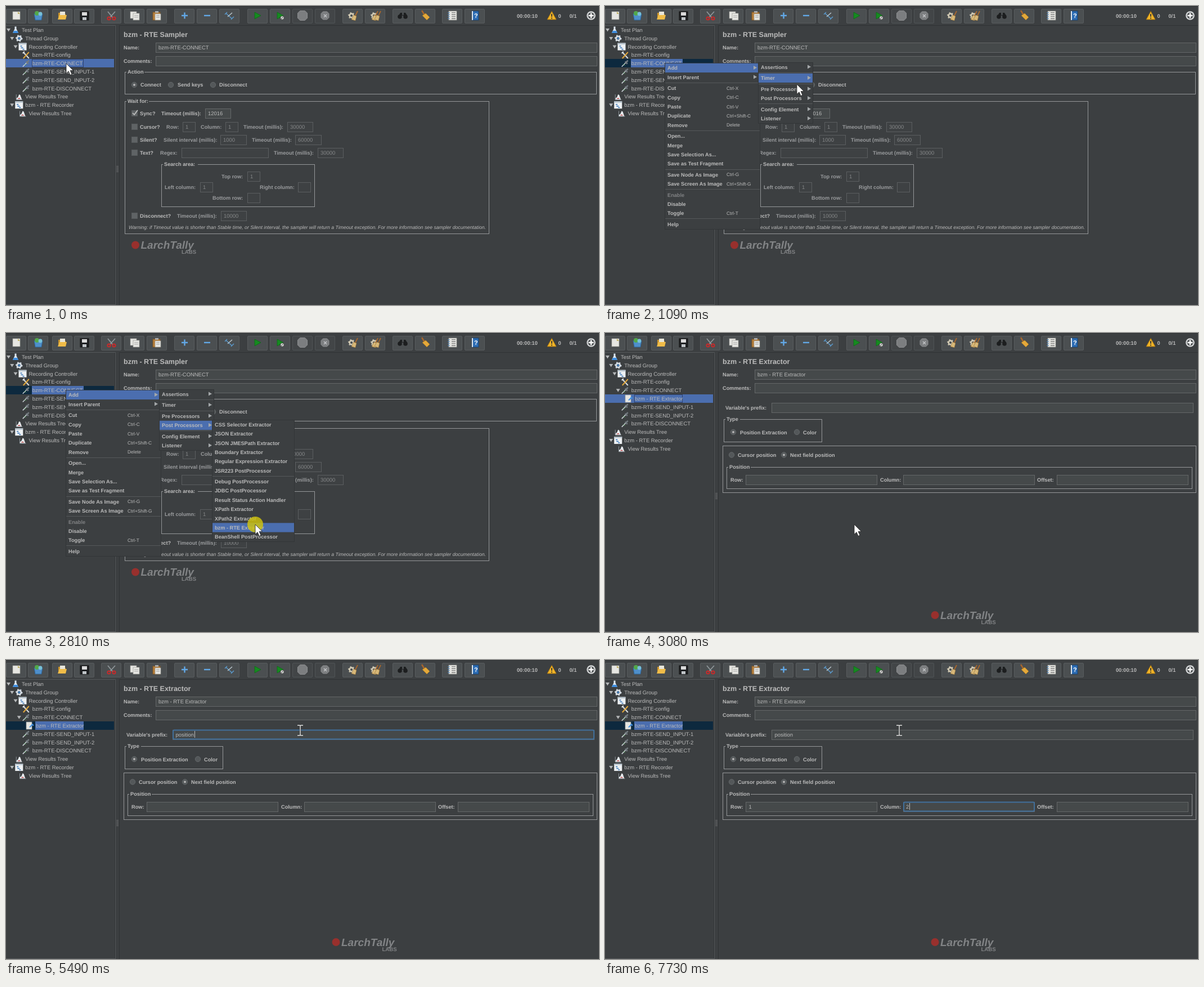
These frames come from a looping animation (1054x531 px, 8 s). An HTML page:

```html
<!DOCTYPE html>
<html lang="en">
<head>
<meta charset="utf-8">
<title>RTE Extractor</title>
<style>
  html, body { margin: 0; width: 100%; height: 100%; overflow: hidden; background: #3c3f41; }
  svg { display: block; width: 1054px; height: 531px; }
  text { font-family: "Liberation Sans", Arial, sans-serif; text-rendering: geometricPrecision; white-space: pre; }
</style>
</head>
<body>
<svg id="stage" viewBox="0 0 1054 531" xmlns="http://www.w3.org/2000/svg"></svg>
<script>
const BG = '#3c3f41', FG = '#bbbbbb', DIM = '#9a9c9e', OFF = '#868889', BLUE = '#4b6eaf', NAVY = '#0d293e', RING = '#41709c';
const LOOP = 8000;

// ---- drawing helpers, all return markup
const rect = (x, y, w, h, fill = 'none', stroke = 'none', extra = '') =>
  `<rect x="${x}" y="${y}" width="${w}" height="${h}" fill="${fill}" stroke="${stroke}" ${extra}/>`;
const box = (x, y, w, h, fill, stroke, extra) => rect(x + .5, y + .5, w - 1, h - 1, fill, stroke, extra);
const path = (d, fill = 'none', stroke = 'none', w = 1) =>
  `<path d="${d}" fill="${fill}" stroke="${stroke}" stroke-width="${w}"/>`;
const dot = (x, y, r, fill, stroke = 'none', w = 1) =>
  `<circle cx="${x}" cy="${y}" r="${r}" fill="${fill}" stroke="${stroke}" stroke-width="${w}"/>`;
const text = (x, cy, str, size = 9.45, fill = FG, extra = '') =>
  `<text x="${x}" y="${(cy + size * .36).toFixed(2)}" font-size="${size}" fill="${fill}" ${extra}>${str}</text>`;
const bold = (x, cy, str, fill = FG, size = 9.2) => text(x, cy, str, size, fill, 'font-weight="700"');
const group = (id, body) => `<g id="${id}">${body}</g>`;
const at = (x, y, body) => `<g transform="translate(${x} ${y})">${body}</g>`;

const field = (x, cy, w, str = '', off = false) =>
  box(x, Math.round(cy - 9), w, 18, off ? '#3e4143' : '#45494a', off ? '#5b5e60' : '#646768') +
  text(x + 5, cy, str, 9.45, off ? OFF : FG);
const frame = (x, y, w, h, title = '', gap = 0) =>
  box(x, y, w, h, 'none', '#959799') +
  (title && rect(x + 3, y - 3, gap, 8, BG) + bold(x + 5, y, title));
const radio = (x, y, on) => dot(x, y, 4.7, '#54585a', '#64686a') + (on ? dot(x, y, 2, '#b4b4b4') : '');
const check = (x, y, on) => box(x - 5, y - 5, 11, 11, '#5f6365', '#575b5d') +
  (on ? path(`M${x - 3} ${y}l3 3 6-8`, 'none', '#c4c4c4', 1.6) : '');
const logo = (x, y) => dot(x + 10, y, 7, '#98302d') +
  text(x + 19.5, y, 'LarchTally', 19, '#828486', 'font-weight="700" font-style="italic"') +
  bold(x + 92, y + 12.5, 'LABS', '#828486', 9.6);

// ---- toolbar
const page = (x, y, w, h) => rect(x, y, w, h, '#e6e6e2', '#9a9a96', 'stroke-width=".7"');
const gear = (r, fill) => dot(0, 0, r, 'none', fill, r * .75) +
  `<circle r="${r * 1.45}" fill="none" stroke="${fill}" stroke-width="2" stroke-dasharray="2 ${(r * .9).toFixed(2)}"/>`;
const octagon = s => path(`M${-s / 2} ${-s}H${s / 2}L${s} ${-s / 2}V${s / 2}L${s / 2} ${s}H${-s / 2}L${-s} ${s / 2}V${-s / 2}Z`, '#7c7e80', '#8c8e90');
const broom = (x, y) => path(`M${x + 5} ${y - 9}l-4 8`, 'none', '#a8662c', 1.8) +
  path(`M${x - 2} ${y - 2}l5 2-2 8-7-2z`, '#d8b878', '#8f6c34', .6);
const play = path('M-5-6L6 0-5 6Z', '#168a20', '#0c6a16', .8);
const gears = at(-2, 0, gear(3.4, '#d2cab4'));

const tools = [
  [18, page(-6, -7, 13, 14) + path('M3-7l4 4h-4z', '#c0b060')],
  [57, path('M-7-3H8L6 8H-5Z', '#4e8fca', '#2f6394') + dot(-2, -4, 4, '#52a84a') + dot(4, -3, 3.4, '#78c0d8')],
  [100, path('M-7 7V-5h5l2 2h6V7Z', '#c8922a') + rect(-4, -7, 9, 8, '#e8e6da') + path('M-8 7l3-8H8L6 7Z', '#f0bc48')],
  [139, rect(-7, -7, 15, 15, '#202224', '#111') + rect(-4, -6, 9, 6, '#dadada') + rect(-3, 3, 7, 5, '#bfc4c8')],
  [187, path('M-6-7L3 4M7-7L-3 4', 'none', '#8f969a', 1.8) + dot(-4, 5, 2.6, 'none', '#c82a2a', 2) + dot(5, 5, 2.6, 'none', '#c82a2a', 2)],
  [228, page(-7, -7, 11, 12) + page(-2, -4, 11, 12) + path('M0 0h7M0 3h7', 'none', '#999', .8)],
  [268, rect(-7, -6, 13, 14, '#b8803c', '#7c5524') + rect(-3, -8, 6, 3, '#aaa') + page(-3, -3, 10, 11) + path('M-1 0h6M-1 3h6', 'none', '#888', .8)],
  [317, path('M-5 0H6M.5-5.500V5.500', 'none', '#62a8e6', 2.4)],
  [357, path('M-5 0H6', 'none', '#62a8e6', 2.4)],
  [397, path('M-8-2l4-4M-6-4L4 5M3 7l5-5', 'none', '#5a97c8', 1.6) + path('M-3 2L5-5', 'none', '#bcc8ce', 1.4)],
  [447, play],
  [487, play + dot(4, 4, 3.2, '#d8d8d8', '#333', .7) + path('M2.500 5.500l3-3', 'none', '#333')],
  [527, octagon(8.5), 1],
  [567, octagon(7) + path('M-2-2L3 3M3-2L-2 3', 'none', '#c4c6c8', 1.4), 1],
  [616, gears + broom(4, 1)],
  [656, gears + broom(0, 1) + broom(5, 1)],
  [705, dot(-5, 2, 3.8, '#1c1e1f') + dot(5, 2, 3.8, '#1c1e1f') + path('M-7 0l3-5h3v4h3v-4h3l3 5Z', '#1c1e1f')],
  [745, path('M-6-9l5 8', 'none', '#a8662c', 2.4) + path('M-5 0l6-4 7 7-5 5z', '#e4a83a', '#a87a20', .7)],
  [793, page(-6, -8, 14, 16) + path('M-1-5h7M-1-1.500h7M-1 2h7M-1 5.500h7', 'none', '#555', 1.2) + path('M-8-5h4M-8-1.500h4M-8 2h4M-8 5.500h4', 'none', '#4c86c0', 1.2)],
  [833, rect(-5, -8, 12, 16, '#2c6cb4', '#17406e') + rect(-5, -8, 2, 16, '#dfe6ec') + bold(-1, 0, '?', '#fff', 11)]
];
const toolbar = rect(0, 0, 1054, 1, '#2e3133') +
  tools.map(([x, icon, off]) => box(x - 18, 5, 36, 26, off ? '#424547' : '#4b4f51', off ? '#505456' : '#585c5e', 'rx="1.500"') + at(x, 17, icon)).join('') +
  bold(908, 17.5, '00:00:10') + path('M970 9.500L978 24H962Z', '#f0b428', '#a87410') +
  path('M970 14v5M970 20.500v2', 'none', '#333', 1.8) + bold(981.5, 17.5, '0') + bold(1001.5, 17.5, '0/1') +
  dot(1040, 17, 7.8, '#d8dadb') + dot(1040, 17, 5.6, '#505456') + path('M1040 12.500v9M1035.500 17h9', 'none', '#fff', 2.4);

const split = path('M0 34.500H194.500V531', 'none', '#55585a') + path('M193.500 35V531', 'none', '#313436') +
  path('M201.500 531V34.500H1054', 'none', '#2f3234') + rect(0, 530, 194, 1, '#55585a') +
  path('M197 284v11M199 284v11', 'none', '#8a8c8e', 1).replace('/>', ' stroke-dasharray="1 1"/>');

// ---- tree
const rowY = i => 42.6 + 14.79 * i;
const treeIcon = {
  flask: path('M-1.500-6h3v4l3.500 7.500h-10L-1.500-2z', '#dce6ee') + path('M-3.200 1.500h6.400l1.800 4h-10z', '#3f8ee0'),
  gear: gear(3.6, '#d6dee6') + dot(0, 0, 1.8, '#3f7fc0'),
  window: rect(-7, -6.5, 14, 13, '#eef1f3') + rect(-7, -6.5, 14, 2.5, '#b4c0ca') + path('M-4-1h3M-3 2h4M0 4.500h3', 'none', '#2f6fb4', 1.6),
  tools: path('M-5-5L5 6', 'none', '#d8dde0', 2) + path('M5-5L-5 6', 'none', '#e0a63a', 2) + path('M-6-3l3-3', 'none', '#d8dde0', 2),
  pipette: path('M-6 6L2-2', 'none', '#c8d0d4', 1.6) + path('M0-3L4 1M1-1L5-5', 'none', '#737b80', 2.6) + path('M-3 1L0 4', 'none', '#4c9a52', 1),
  chart: path('M-5 5.500V3l3-2 2-5 2 1 3 8.500z', '#e8ecef') + path('M-5-4V5.500H6', 'none', '#8a9298') + path('M-3 4l3-2 3 2z', '#c04848'),
  extract: page(-6, -6.5, 10, 13) + path('M0 3l5-5M4-3l3 3', 'none', '#3f8ee0', 2)
};
const node = (i, depth, icon, label, arrow) => {
  const y = rowY(i), x = 28 + depth * 6.25;
  return (arrow ? path(`M${x - 27} ${y - 2.5}h7l-3.500 5.500z`, '#b4b6b8') : '') + at(x - 11, y, treeIcon[icon]) + text(x, y, label);
};
const selection = (id, i, x) => {
  const y = Math.round(rowY(i) - 7.5);
  return group(id + 'Lit', rect(0, y, 192, 15, BLUE) + box(x, y, 138 - x, 15, 'none', '#2c406c')) +
    group(id + 'Dim', rect(0, y, 192, 15, NAVY) + rect(x, y, 138 - x, 15, BLUE));
};
const treeTop = node(0, 0, 'flask', 'Test Plan', 1) + node(1, 1, 'gear', 'Thread Group', 1) +
  node(2, 2, 'window', 'Recording Controller', 1) + node(3, 3, 'tools', 'bzm-RTE-config');
const treeEnd = i => node(i, 3, 'pipette', 'bzm-RTE-SEND_INPUT-1') + node(i + 1, 3, 'pipette', 'bzm-RTE-SEND_INPUT-2') +
  node(i + 2, 3, 'pipette', 'bzm-RTE-DISCONNECT') + node(i + 3, 1, 'chart', 'View Results Tree') +
  node(i + 4, 1, 'window', 'bzm - RTE Recorder', 1) + node(i + 5, 2, 'chart', 'View Results Tree');

// ---- panels
const head = (title, name) => bold(209, 50.4, title, FG, 12.5) + bold(209, 74, 'Name:') + field(266, 74, 785, name) +
  bold(209, 98, 'Comments:') + field(266, 98, 785);
const option = (y, label, on) => check(228, y - 1, on) + bold(238, y, label);
const entry = (lx, y, label, fx, w, value) => bold(lx, y, label, DIM) + field(fx, y, w, value, true);
const timeout = 'Timeout (millis):';
const sampler = head('bzm - RTE Sampler', 'bzm-RTE-CONNECT') +
  frame(211, 117, 839, 40, 'Action', 32) + radio(228, 140, 1) + bold(239, 140, 'Connect') +
  radio(293, 140) + bold(305, 140, 'Send keys') + radio(368, 140) + bold(379, 140, 'Disconnect') +
  frame(211, 169, 648, 236, 'Wait for:', 40) +
  option(191, 'Sync?', 1) + bold(276, 191, timeout) + field(354, 191, 46, '12016') +
  option(215, 'Cursor?') + entry(285, 215, 'Row:', 314, 23, '1') + entry(346, 215, 'Column:', 390, 23, '1') + entry(422, 215, timeout, 500, 46, '30000') +
  option(238, 'Silent?') + entry(280, 238, 'Silent interval (millis):', 381, 47, '1000') + entry(437, 238, timeout, 514, 47, '60000') +
  option(261, 'Text?') + entry(274, 261, 'Regex:', 312, 155) + entry(476, 261, timeout, 554, 46, '30000') +
  frame(276, 281, 273, 76, 'Search area:', 62) + entry(383, 303, 'Top row:', 429, 23, '1') +
  entry(282, 322, 'Left column:', 345, 23, '1') + entry(451, 322, 'Right column:', 519, 23) + entry(367, 341, 'Bottom row:', 429, 23) +
  option(373, 'Disconnect?') + entry(304, 373, timeout, 382, 46, '10000') +
  text(218, 392.5, 'Warning: if Timeout value is shorter than Stable time, or Silent interval, the sampler will return a Timeout exception. For more information see sampler documentation.', 8.69, FG, 'font-style="italic"') +
  logo(220, 424.5);

const ring = (id, x, y, w, h) => group(id, rect(x, y, w, h, 'none', RING, 'rx="2" stroke-width="2"'));
const halo = (id, x, y) => group(id, dot(x, y, 5.4, 'none', RING, 2));
const extractor = head('bzm - RTE Extractor', 'bzm - RTE Extractor') +
  bold(214, 133, "Variable's prefix:") + field(296, 133, 750) + ring('prefixRing', 297, 124.5, 748, 16) +
  frame(211, 153, 175, 41, 'Type', 26) + radio(228, 176, 1) + bold(240, 176.5, 'Position Extraction') + radio(341, 176) + bold(352, 176.5, 'Color') +
  halo('typeHalo', 228, 176) +
  frame(209, 200, 842, 84) + radio(225, 216.5) + bold(236, 217, 'Cursor position') + radio(318, 216.5, 1) + bold(329, 217, 'Next field position') +
  halo('nextHalo', 318, 216.5) +
  frame(216, 238, 828, 39, 'Position', 40) +
  bold(223, 260.5, 'Row:') + field(250, 260.5, 234) + bold(489, 260.5, 'Column:') + field(530, 260.5, 234) + bold(768, 260.5, 'Offset:') + field(803, 260.5, 234) +
  ring('rowRing', 251, 252.5, 232, 16) + ring('colRing', 531, 252.5, 232, 16) +
  group('typed', text(301.5, 133, '') + text(255.5, 260.5, '') + text(535, 260.5, '')) +
  `<rect id="caret" width="1" height="12" fill="${FG}"/>` + logo(576.5, 501);

// ---- menus: items are [centre y, label, shortcut]; ">" opens a submenu
const menu = (id, x, y, w, h, hl, items, seps, keyX) => group(id,
  box(x, y, w, h, BG, '#323537') + seps.map(s => rect(x + 1, s, w - 2, 1, '#55585a')).join('') +
  rect(x + 1, 0, hl, 16.3, BLUE, 'none', `id="${id}Hl"`) +
  items.map(([cy, label, key]) => bold(x + 5, cy, label, label === 'Enable' ? '#808284' : FG) +
    (key === '>' ? path(`M${x + hl - 8} ${cy - 4}v7l6-3.500z`, '#a4a8aa') : key ? text(keyX, cy, key, 8.3) : '')).join(''));

const mainItems = [[110, 'Add', '>'], [126.5, 'Insert Parent', '>'], [146, 'Cut', 'Ctrl-X'], [162.5, 'Copy', 'Ctrl-C'],
  [179, 'Paste', 'Ctrl-V'], [195, 'Duplicate', 'Ctrl+Shift-C'], [211.5, 'Remove', 'Delete'], [231, 'Open...'], [247.5, 'Merge'],
  [264, 'Save Selection As...'], [280, 'Save as Test Fragment'], [299.5, 'Save Node As Image', 'Ctrl-G'],
  [316, 'Save Screen As Image', 'Ctrl+Shift-G'], [335.5, 'Enable'], [352, 'Disable'], [368, 'Toggle', 'Ctrl-T'], [387.5, 'Help']];
const addItems = [[108.5, 'Assertions'], [128, 'Timer'], [147.5, 'Pre Processors'], [164, 'Post Processors'],
  [183.5, 'Config Element'], [200, 'Listener']].map(i => [...i, '>']);
const postItems = ['CSS Selector Extractor', 'JSON Extractor', 'JSON JMESPath Extractor', 'Boundary Extractor',
  'Regular Expression Extractor', 'JSR223 PostProcessor', 'Debug PostProcessor', 'JDBC PostProcessor',
  'Result Status Action Handler', 'XPath Extractor', 'XPath2 Extractor', 'bzm - RTE Extractor', 'BeanShell PostProcessor']
  .map((label, i) => [162.5 + 16.35 * i + (i > 5 ? 3.2 : 0), label]);

const arrow = path('M0 0V17.500L4.100 13.700 7 20.500 10 19.200 7.100 12.600H12.500Z', '#fff', '#222', .8);
const beamLine = 'M-5-9h4l1 1 1-1h4M-5 9h4l1-1 1 1h4M0-9V9';
const beam = path(beamLine, 'none', '#2a2c2d', 2.4) + path(beamLine, 'none', '#e8e8e8', 1.4);

const $ = id => document.getElementById(id);
$('stage').innerHTML = rect(0, 0, 1054, 531, BG) + toolbar + split +
  group('before', selection('a', 4, 46) + treeTop + node(4, 3, 'pipette', 'bzm-RTE-CONNECT') + treeEnd(5) + sampler) +
  group('after', selection('b', 5, 52) + treeTop + node(4, 3, 'pipette', 'bzm-RTE-CONNECT', 1) +
    node(5, 4, 'extract', 'bzm - RTE Extractor') + treeEnd(6) + extractor) +
  menu('main', 106, 101, 170, 296, 166, mainItems, [136, 221, 290, 325, 377], 216) +
  menu('add', 272, 100, 98, 109, 96, addItems, [118, 138, 173]) +
  menu('post', 366, 154, 147, 217, 145, postItems, [254]) +
  group('pointer', '<circle id="press" r="14" fill="#cfc30e" opacity=".82"/>' + group('arrow', arrow) + group('beam', beam));

// ---- timeline: visible spans in ms
const spans = {
  before: [[0, 2940]], after: [[2940, LOOP]],
  aLit: [[0, 200], [2860, 2940]], aDim: [[200, 2860]], bLit: [[2940, 3720]], bDim: [[3720, LOOP]],
  main: [[200, 2860]], add: [[620, 2860]], post: [[1480, 2860]],
  press: [[130, 270], [2740, 2860], [3690, 3830]], arrow: [[0, 3640]], beam: [[3640, LOOP]],
  prefixRing: [[3720, 6020]], typeHalo: [[6020, 6350]], nextHalo: [[6350, 6680]],
  rowRing: [[6680, 7470]], colRing: [[7470, LOOP]],
  caret: [[3720, 4220], [4480, 6020], [6680, 7140], [7270, LOOP]]
};
const moves = [[0, 107, 102], [300, 107, 102], [480, 175, 108], [620, 262, 112], [880, 335, 112], [950, 338, 118],
  [1015, 340, 128], [1090, 341, 139], [1240, 339, 160], [1500, 343, 164], [1700, 402, 176], [1765, 418, 206],
  [1840, 435, 222], [2020, 440, 262], [2250, 442, 305], [2500, 443, 340], [3080, 443, 340], [3300, 425, 280],
  [3560, 404, 160], [3690, 404, 133], [3865, 404, 133], [3940, 523, 125], [LOOP, 523, 125]];
const typing = [
  ['position', 301.5, 126, [4480, 4550, 4770, 4950, 5150, 5220, 5290, 5490]],
  ['1', 255.5, 254, [7270]],
  ['2', 535, 254, [7730]]
];
const lines = $('typed').children;

// the pointer was sampled every 75 ms
const sample = t => Math.max(0, 40 + Math.floor((t - 40) / 75) * 75);
function pointerAt(t) {
  const i = Math.max(1, moves.findIndex(m => m[0] > t));
  const [t0, x0, y0] = moves[i - 1], [t1, x1, y1] = moves[i];
  const k = (t - t0) / (t1 - t0);
  return [x0 + (x1 - x0) * k, y0 + (y1 - y0) * k];
}
function highlight(id, items, y) {
  const hit = items.find(i => Math.abs(i[0] - y) <= 8.2);
  $(id).style.display = hit ? '' : 'none';
  if (hit) $(id).setAttribute('y', hit[0] - 8.2);
}

function render(t) {
  for (const id in spans)
    $(id).style.display = spans[id].some(([a, b]) => t >= a && t < b) ? '' : 'none';

  const now = sample(t), [x, y] = pointerAt(now);
  $('pointer').setAttribute('transform', `translate(${x.toFixed(1)} ${y.toFixed(1)})`);

  // menu highlights trail the pointer by one sample
  const [hx, hy] = pointerAt(Math.max(0, now - 75));
  const inPost = hx > 367;
  highlight('mainHl', t >= 400 ? mainItems : [], 110);
  highlight('addHl', hx > 273 ? addItems : [], inPost ? 164 : hy);
  highlight('postHl', inPost ? postItems : [], hy);

  typing.forEach(([str, , , times], i) => {
    const shown = str.slice(0, times.filter(k => k <= t).length);
    if (lines[i].textContent !== shown) lines[i].textContent = shown;
  });
  const active = t < 6100 ? 0 : t < 7470 ? 1 : 2;
  const [, cx, cy] = typing[active];
  const width = lines[active].textContent ? lines[active].getComputedTextLength() : 0;
  $('caret').setAttribute('x', Math.ceil(cx + width));
  $('caret').setAttribute('y', cy);
}

const start = performance.now();
function tick() {
  render((performance.now() - start) % LOOP);
  requestAnimationFrame(tick);
}
tick();
</script>
</body>
</html>
```
